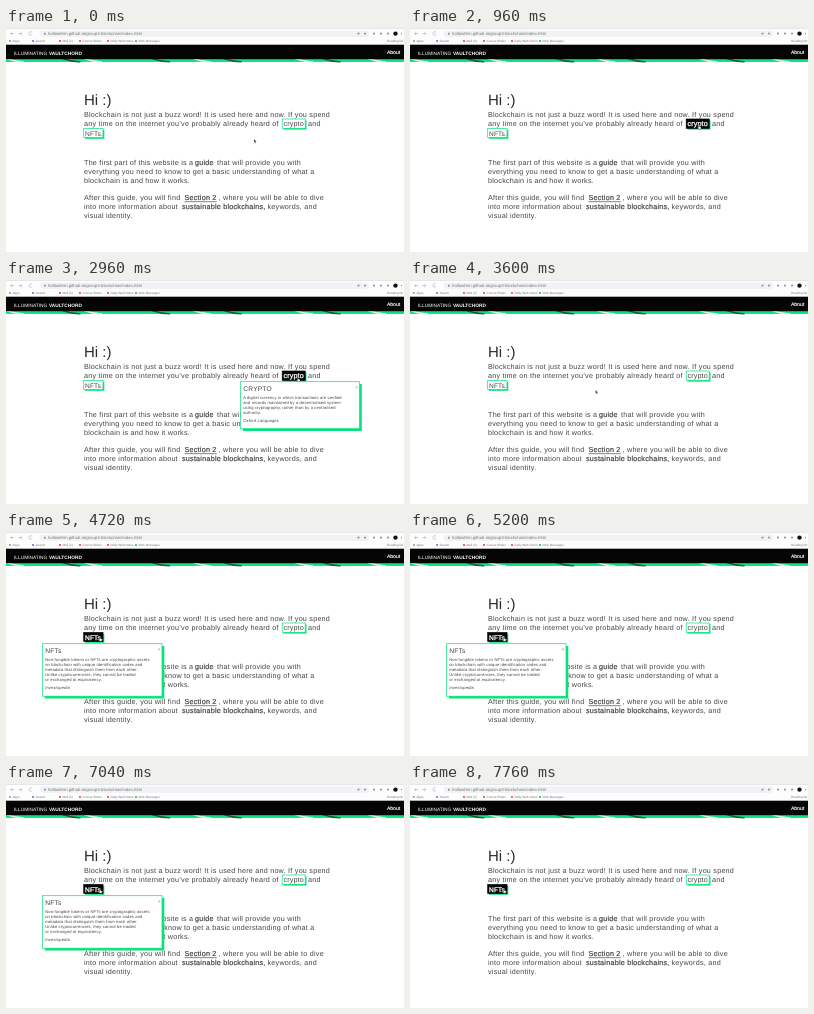
An HTML page for the animation above (7840 ms loop, 398 by 224 pixels).

```html
<!DOCTYPE html>
<html lang="en">
<head>
<meta charset="utf-8">
<title>Blockchain guide</title>
<style>
  html, body { margin: 0; width: 100%; height: 100%; overflow: hidden; background: #fff; }
  svg { display: block; width: 100vw; height: 100vh; }
  text { font-family: "Liberation Sans", Arial, sans-serif; white-space: pre; text-rendering: geometricPrecision; }
  .body { font-size: 7.2px; letter-spacing: .235px; fill: #444; }
  .strong { stroke: #444; stroke-width: .2px; }
  .note { font-size: 4.1px; letter-spacing: .13px; fill: #444; }
  .tab { font-size: 3.1px; fill: #777; }
</style>
</head>
<body>
<svg id="stage" viewBox="0 0 398 224"></svg>
<script>
const LOOP = 7840, STEP = 80, GREEN = "#06e27c";
const stage = document.getElementById("stage");

function add(parent, tag, attrs, content) {
  const node = document.createElementNS("http://www.w3.org/2000/svg", tag);
  for (const key in attrs) node.setAttribute(key, attrs[key]);
  if (content) node.textContent = content;
  parent.append(node);
  return node;
}
const rect = (parent, x, y, width, height, fill, more) =>
  add(parent, "rect", { x, y, width, height, fill, ...more });
const label = (parent, x, y, content, cls, more) =>
  add(parent, "text", { x, y, class: cls, ...more }, content);
const dot = (cx, cy, r, fill) => add(stage, "circle", { cx, cy, r, fill });
const show = (node, on) => node.setAttribute("visibility", on ? "visible" : "hidden");

function drawBrowser() {
  rect(stage, 0, 0, 398, 17, "#fdfdfd");
  rect(stage, 0, 0, 398, .8, "#dfe2e6");
  rect(stage, 34, 2.5, 329, 6.4, "#f0f2f4", { rx: 3.2 });
  add(stage, "path", {
    d: "M6 4.2L4.6 5.6L6 7M4.6 5.6H8M14.5 4.2L16 5.6L14.5 7M16 5.6H12.5M26 4.4A1.7 1.7 0 1 0 26.2 6.2",
    fill: "none", stroke: "#999", "stroke-width": .5
  });
  rect(stage, 38, 4.8, 1.6, 1.8, "#888");
  label(stage, 42, 7, "hollowfern.github.io/group3-blockchain/index.html", "", { "font-size": 4.3, fill: "#777" });
  for (const x of [352.5, 359, 368, 375, 382]) dot(x, 5.6, 1.1, "#999");
  dot(389.5, 5.6, 2.2, "#111");
  dot(395.5, 5.6, .6, "#777");

  const tabs = [
    [4, "#999", "Apps"], [27, "#4a85dd", "Search"], [54, "#e34b45", "Mail (2)"],
    [74, "#e34b45", "Course Slides"], [102, "#e34b45", "Daily Web Notes"], [130, "#31bb62", "Web Messages"]
  ];
  for (const [x, color, name] of tabs) {
    dot(x, 13, 1.1, color);
    label(stage, x + 2.5, 14.1, name, "tab");
  }
  label(stage, 381, 14.1, "Reading list", "tab");
}

function drawHeader() {
  rect(stage, 0, 30.5, 398, 3.4, GREEN);
  for (let i = 0; i < 9; i++) {
    const x = i * 46 + 14 * Math.sin(i * 2.3);
    add(stage, "path", {
      d: `M${x} 30.5q8 3 18 3.4`, fill: "none",
      stroke: i % 2 ? "#155c38" : "#d7f8e7", "stroke-width": 1.4
    });
  }
  rect(stage, 0, 16.7, 398, 14.5, "#050505");
  const white = { "font-size": 4.8, fill: "#fff" };
  label(stage, 8, 27, "ILLUMINATING", "", white);
  label(stage, 43, 27, "VAULTCHORD", "", { ...white, "font-weight": 700 });
  label(stage, 381, 26.4, "About", "", { ...white, "font-size": 5, stroke: "#fff", "stroke-width": .15 });
}

function drawPage() {
  label(stage, 78, 77.3, "Hi :)", "", { "font-size": 15, fill: "#2a2a2a" });
  const runs = [
    [78, 88.7, "Blockchain is not just a buzz word! It is used here and now. If you spend"],
    [78, 98, "any time on the internet you\u2019ve probably already heard of"],
    [302, 98, "and"],
    [78, 136.5, "The first part of this website is a "],
    [189, 136.5, "guide", 1],
    [211, 136.5, "that will provide you with"],
    [78, 145.6, "everything you need to know to get a basic understanding of what a"],
    [78, 154.7, "blockchain is and how it works."],
    [78, 172.4, "After this guide, you will find"],
    [178.5, 172.4, "Section 2", 1],
    [212.5, 172.4, ", where you will be able to dive"],
    [78, 181.4, "into more information about"],
    [176, 181.4, "sustainable blockchains,", 1],
    [261.5, 181.4, "keywords, and"],
    [78, 190.2, "visual identity."]
  ];
  for (const [x, y, content, strong] of runs) label(stage, x, y, content, strong ? "body strong" : "body");
  rect(stage, 178.5, 173.5, 32.3, .6, "#333");
}

function makeTag(x, y, w, h, word, size) {
  rect(stage, x + 1.3, y + 1.3, w, h, GREEN);
  const face = rect(stage, x, y, w, h, "#fff", { stroke: GREEN, "stroke-width": .7 });
  const text = label(stage, x + 1.4, y + 7, word, "", {
    "font-size": size, "letter-spacing": .1, "stroke-width": .3
  });
  return {
    contains: (px, py) => px >= x && px <= x + w && py >= y && py <= y + h,
    setHover(on) {
      face.setAttribute("fill", on ? "#050505" : "#fff");
      face.setAttribute("stroke", on ? "#050505" : GREEN);
      text.setAttribute("fill", on ? "#fff" : "#444");
      text.setAttribute("stroke", on ? "#fff" : "none");
    }
  };
}

function makePopup(x, y, w, h, title, lines, credit) {
  const group = add(stage, "g", {});
  rect(group, x + 2.3, y + 2.3, w, h, GREEN);
  rect(group, x, y, w, h, "#fff", { stroke: GREEN, "stroke-width": .7 });
  label(group, x + 2.7, y + 9.4, title, "", { "font-size": 6.7, "letter-spacing": .2, fill: "#444" });
  lines.forEach((line, i) => label(group, x + 2.7, y + 17.1 + i * 5, line, "note"));
  label(group, x + 2.7, y + 20.6 + lines.length * 5, credit, "note", { "font-style": "italic" });
  label(group, x + w - 4.2, y + 7.2, "\u00d7", "", { "font-size": 5, fill: "#888" });
  return group;
}

drawBrowser();
drawHeader();
drawPage();
const tags = [
  makeTag(276.2, 91, 23, 9.3, "crypto", 7.2),
  makeTag(77.7, 100.5, 19.3, 9, "NFTs.", 6.6)
];
const popups = [
  { from: 1600, to: 3040, node: makePopup(234.5, 101.7, 119, 47, "CRYPTO", [
    "A digital currency in which transactions are verified",
    "and records maintained by a decentralised system",
    "using cryptography, rather than by a centralised",
    "authority."
  ], "Oxford Languages") },
  { from: 4640, to: 7120, node: makePopup(36.5, 111.7, 119.5, 52.5, "NFTs", [
    "Non-fungible tokens or NFTs are cryptographic assets",
    "on blockchain with unique identification codes and",
    "metadata that distinguish them from each other.",
    "Unlike cryptocurrencies, they cannot be traded",
    "or exchanged at equivalency."
  ], "Investopedia") }
];

const arrow = add(stage, "path", {
  d: "M0 0V3.6L.9 2.9L1.5 4.2L2.1 3.9L1.5 2.7H2.6Z",
  fill: "#111", stroke: "#fff", "stroke-width": .35
});
const hand = add(stage, "path", {
  d: "M-.4 0Q0 -.5 .4 0V1.5L2 1.9V3.2L1.5 4.3H-.2L-1.4 2.5L-.9 2.2L-.4 2.7Z",
  fill: "#fff", stroke: "#111", "stroke-width": .35
});

// Pointer stops: time, x, y
const stops = [
  [0, 248, 111], [80, 248, 111], [400, 289, 97], [960, 289, 97], [1200, 292, 97.5],
  [2960, 292, 97.5], [3600, 185.5, 110], [3760, 185.5, 110], [4240, 94, 105], [LOOP, 94, 105]
];
function pointerAt(t) {
  const i = stops.findIndex(stop => stop[0] > t);
  const [t0, x0, y0] = stops[i - 1], [t1, x1, y1] = stops[i];
  const p = (t - t0) / (t1 - t0), ease = p * p * (3 - 2 * p);
  return [x0 + (x1 - x0) * ease, y0 + (y1 - y0) * ease];
}

function render(now) {
  const t = Math.floor((now % LOOP) / STEP) * STEP;
  const [x, y] = pointerAt(t);
  let hovering = false;
  for (const tag of tags) {
    const on = tag.contains(x, y);
    tag.setHover(on);
    hovering = hovering || on;
  }
  for (const { from, to, node } of popups) show(node, t >= from && t < to);
  show(arrow, !hovering);
  show(hand, hovering);
  for (const shape of [arrow, hand]) shape.setAttribute("transform", `translate(${x} ${y})`);
}

const start = performance.now();
function tick() {
  render(performance.now() - start);
  requestAnimationFrame(tick);
}
tick();
</script>
</body>
</html>
```
